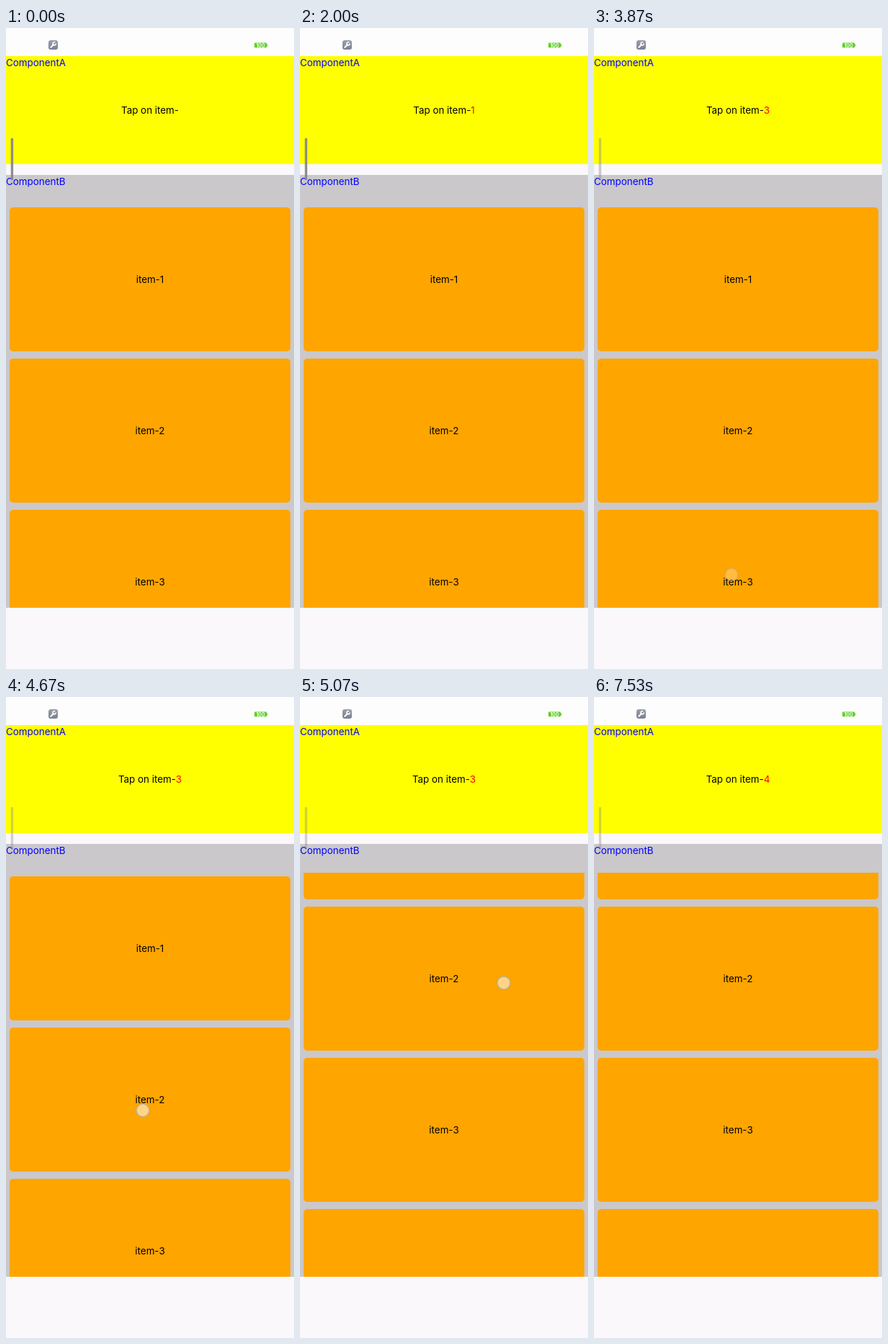
An HTML page that plays this animation: 400x890 px, repeating every 7.67 s.

```html
<!DOCTYPE html>
<html lang="en">
<head>
<meta charset="utf-8">
<style>
  html, body { margin: 0; width: 100%; height: 100%; overflow: hidden; background: #faf8fb; }
  svg { display: block; width: 100%; height: 100%; }
  text { font: 13.4px Inter, Roboto, sans-serif; }
  .mid { text-anchor: middle; }
  .label { fill: #00f; }
</style>
</head>
<body>
<svg viewBox="0 0 400 890">
  <defs>
    <clipPath id="view"><rect y="244" width="400" height="561"/></clipPath>
    <linearGradient id="steel" x2="0" y2="1">
      <stop stop-color="#9a9eac"/><stop offset="1" stop-color="#7b8090"/>
    </linearGradient>
  </defs>
  <rect width="400" height="39" fill="#fefdfe"/>
  <rect x="59" y="17" width="13" height="13" rx="3" fill="url(#steel)"/>
  <path d="M62.3 26.7L66 23" stroke="#fff" stroke-width="2" stroke-linecap="round"/>
  <path d="M68.3 19.9A2.2 2.2 0 1 0 69.3 21.5" fill="none" stroke="#fff" stroke-width="1.6"/>
  <rect x="345" y="20.5" width="17" height="6.8" rx="1" fill="#64cf2c"/>
  <rect x="362" y="22.5" width="1.2" height="3" fill="#64cf2c"/>
  <text class="mid" x="353.5" y="26.6" fill="#fff" style="font-size:7px;font-weight:600">100</text>

  <rect y="39" width="400" height="150" fill="#ff0"/>
  <text class="label" y="53">ComponentA</text>
  <text class="mid" x="200" y="119">Tap on item-<tspan id="picked" fill="red"></tspan></text>

  <rect y="204" width="400" height="601" fill="#cac8cb"/>
  <text class="label" y="218">ComponentB</text>
  <g clip-path="url(#view)"><g id="list"></g></g>

  <rect id="bar" x="6.7" y="153" width="3.4" height="58" rx="1" fill="#888"/>
  <circle id="touch" r="9" fill="#fff" fill-opacity=".52" stroke="#a9a9a9" stroke-opacity=".65" stroke-width="1.8"/>
</svg>
<script>
const LOOP = 7670;
const $ = id => document.getElementById(id);
const ramp = (t, a, b) => Math.min(1, Math.max(0, (t - a) / (b - a)));
const smooth = p => p * p * (3 - 2 * p);

// Each tap: finger down, finger up (label changes), finger gone
const taps = [
  { down: 1600, up: 1800, gone: 1940, x: 191, y: 349 },
  { down: 2670, up: 2870, gone: 3010, x: 191, y: 559 },
  { down: 3600, up: 3800, gone: 3940, x: 191, y: 759 },
  { down: 6070, up: 6270, gone: 6410, x: 191, y: 759 }
];
const drag = { down: 4670, up: 5130, gone: 5270, x: 190, y: 574, dx: 93, dy: -177 };
const SLOP = 9;

$("list").innerHTML = [1, 2, 3, 4].map(n => {
  const y = 249 + 210 * (n - 1);
  return `<rect x="5" y="${y}" width="390" height="200" rx="5" fill="#ffa500"/>
    <text class="mid" x="200" y="${y + 105}">item-${n}</text>`;
}).join("");

function draw(t) {
  const moved = smooth(ramp(t, 4690, 5050));
  const scroll = Math.max(0, -drag.dy * moved - SLOP);
  $("list").setAttribute("transform", `translate(0 ${-scroll})`);

  $("picked").textContent = taps.filter(p => t >= p.up).length || "";
  $("bar").setAttribute("opacity", 0.95 - 0.58 * ramp(t, 3600, 3900));

  const p = [...taps, drag].find(p => t >= p.down && t < p.gone);
  const touch = $("touch");
  touch.setAttribute("opacity", p ? 1 - ramp(t, p.up, p.gone) : 0);
  if (p) {
    touch.setAttribute("cx", p.x + (p.dx || 0) * moved);
    touch.setAttribute("cy", p.y + (p.dy || 0) * moved);
  }
}

const start = performance.now();
function tick() {
  draw((performance.now() - start) % LOOP);
  requestAnimationFrame(tick);
}
tick();
</script>
</body>
</html>
```
